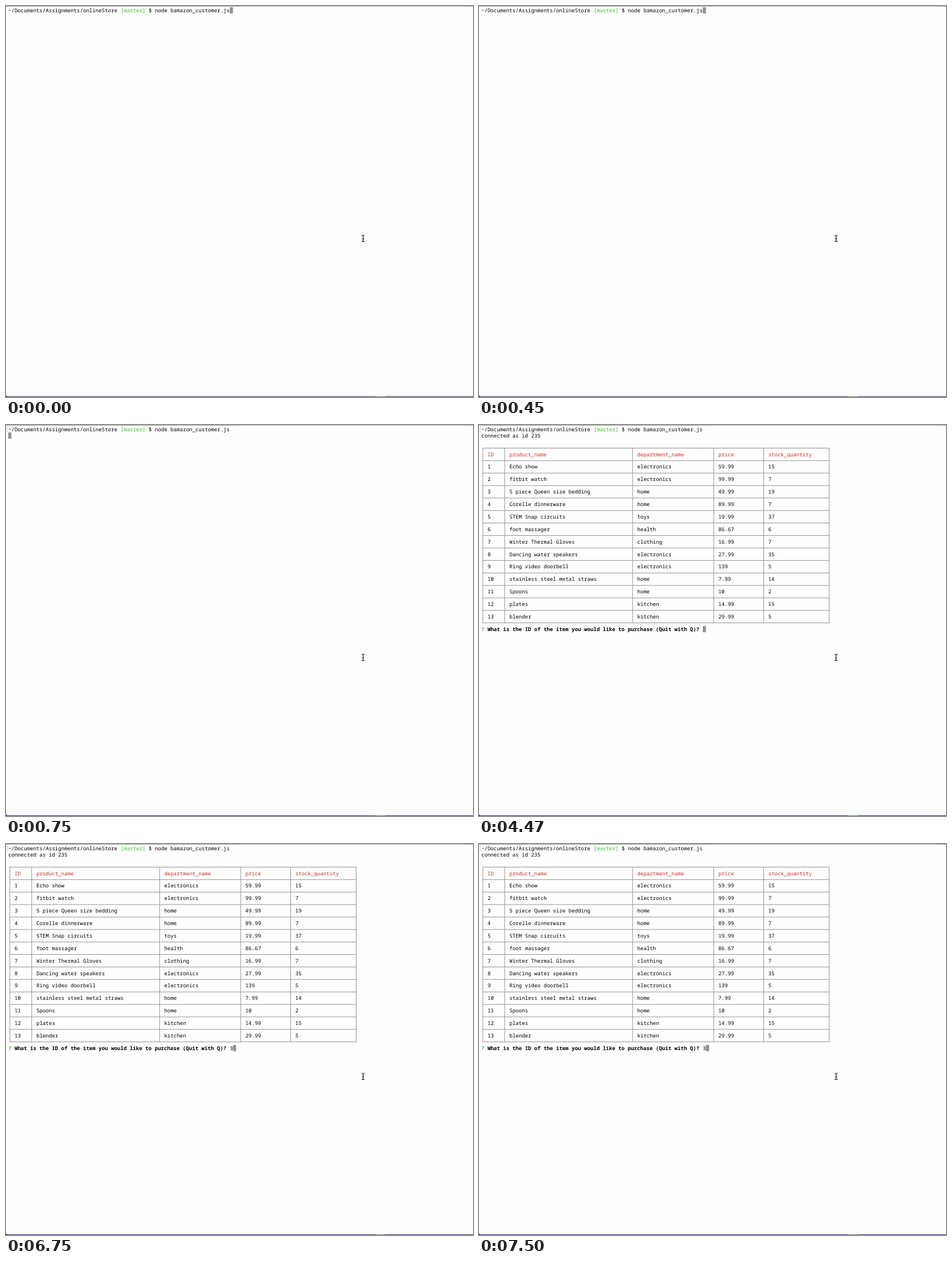
Recreate the animation shown at these times as an HTML page. Size 818 px wide and 685 px high, loop 8 s.

```html
<!DOCTYPE html>
<html lang="en">
<head>
<meta charset="utf-8">
<title>Store terminal</title>
<style>
  html, body { margin: 0; width: 100%; height: 100%; overflow: hidden; background: #fefefe; }
  svg { display: block; }
  text {
    font: 500 9.108px "Noto Sans Mono", "DejaVu Sans Mono", monospace;
    white-space: pre;
    text-rendering: geometricPrecision;
  }
  .green { fill: #2fc41f; }
  .red { fill: #c8321f; }
  .bold { font-weight: 700; }
</style>
</head>
<body>
<svg id="stage" width="818" height="685" viewBox="0 0 818 685">
  <rect width="818" height="1" fill="#b4b4b4"/>
  <path d="M0 .5H411M803 .5H818" stroke="#999"/>
  <path d="M0 684.5H818" stroke="#24247c"/>
  <path d="M0 681Q.5 684 4 685H0Z" fill="#24247c"/>
  <path d="M647 684.5H664" stroke="#4f8055"/>
  <path id="mark" d="M3.4 3H2V12H3.4" fill="none" stroke="#bbb" stroke-width=".8"/>
  <g id="command"></g>
  <g id="output"></g>
  <rect id="cursor" width="5.465" height="10.935" fill="#919191"/>
  <g id="answer"></g>
  <path d="M622.8 401.5Q625.5 401.5 625.5 403.5Q625.5 401.5 628.2 401.5M625.5 403V411.5M622.8 412.8Q625.5 412.8 625.5 411Q625.5 412.8 628.2 412.8M624 408H627"
    fill="none" stroke="#111" stroke-width="1.1"/>
</svg>
<script>
const CELL_W = 5.465, CELL_H = 10.935, LEFT = 4, TOP = 2.2;
const colX = col => LEFT + col * CELL_W;
const rowY = row => TOP + row * CELL_H;
const byId = id => document.getElementById(id);

function add(parent, tag, attrs, content = "") {
  const node = document.createElementNS("http://www.w3.org/2000/svg", tag);
  for (const key in attrs) node.setAttribute(key, attrs[key]);
  node.textContent = content;
  parent.append(node);
}

function write(parent, row, col, content, style = "") {
  add(parent, "text", { x: colX(col), y: rowY(row) + 8.6, class: style }, content);
}

const command = byId("command"), output = byId("output"), answer = byId("answer");
const PROMPT_ROW = 32, INPUT_COL = 71;

write(command, 0, 0, "~/Documents/Assignments/onlineStore");
write(command, 0, 36, "[master]", "green");
write(command, 0, 45, "$ node bamazon_customer.js");

const table = `ID|product_name|department_name|price|stock_quantity
1|Echo show|electronics|59.99|15
2|fitbit watch|electronics|99.99|7
3|5 piece Queen size bedding|home|49.99|19
4|Corelle dinnerware|home|89.99|7
5|STEM Snap circuits|toys|19.99|37
6|foot massager|health|86.67|6
7|Winter Thermal Gloves|clothing|16.99|7
8|Dancing water speakers|electronics|27.99|35
9|Ring video doorbell|electronics|139|5
10|stainless steel metal straws|home|7.99|14
11|Spoons|home|10|2
12|plates|kitchen|14.99|15
13|blender|kitchen|29.99|5`.split("\n").map(line => line.split("|"));

// Borders run through the middle of their character cells.
const borders = [0, 7, 48, 74, 90, 111];
const borderX = borders.map(col => colX(col + 0.5));
const borderY = i => rowY(3.5 + 2 * i);
let grid = "";
for (const x of borderX) grid += `M${x} ${borderY(0)}V${borderY(table.length)}`;
for (let i = 0; i <= table.length; i++) grid += `M${borderX[0]} ${borderY(i)}H${borderX.at(-1)}`;
add(output, "path", { d: grid, fill: "none", stroke: "#919191", "stroke-linecap": "square" });

write(output, 1, 0, "connected as id 235");
table.forEach((cells, i) => cells.forEach((cell, j) =>
  write(output, 4 + 2 * i, borders[j] + 2, cell, i ? "" : "red")));
write(output, PROMPT_ROW, 0, "?", "green bold");
write(output, PROMPT_ROW, 2, "What is the ID of the item you would like to purchase (Quit with Q)?", "bold");
write(answer, PROMPT_ROW, INPUT_COL, "3");

const LOOP = 8000, ENTER = 750, RESULT = 1050, TYPE = 6750;
const show = (node, visible) => node.setAttribute("visibility", visible ? "visible" : "hidden");
const start = performance.now();

function draw() {
  const time = (performance.now() - start) % LOOP;
  show(byId("mark"), time >= ENTER);
  show(output, time >= RESULT);
  show(answer, time >= TYPE);
  const [row, col] =
    time < ENTER ? [0, INPUT_COL] :
    time < RESULT ? [1, 0] :
    time < TYPE ? [PROMPT_ROW, INPUT_COL] : [PROMPT_ROW, INPUT_COL + 1];
  byId("cursor").setAttribute("x", colX(col));
  byId("cursor").setAttribute("y", rowY(row));
  requestAnimationFrame(draw);
}
draw();
</script>
</body>
</html>
```
